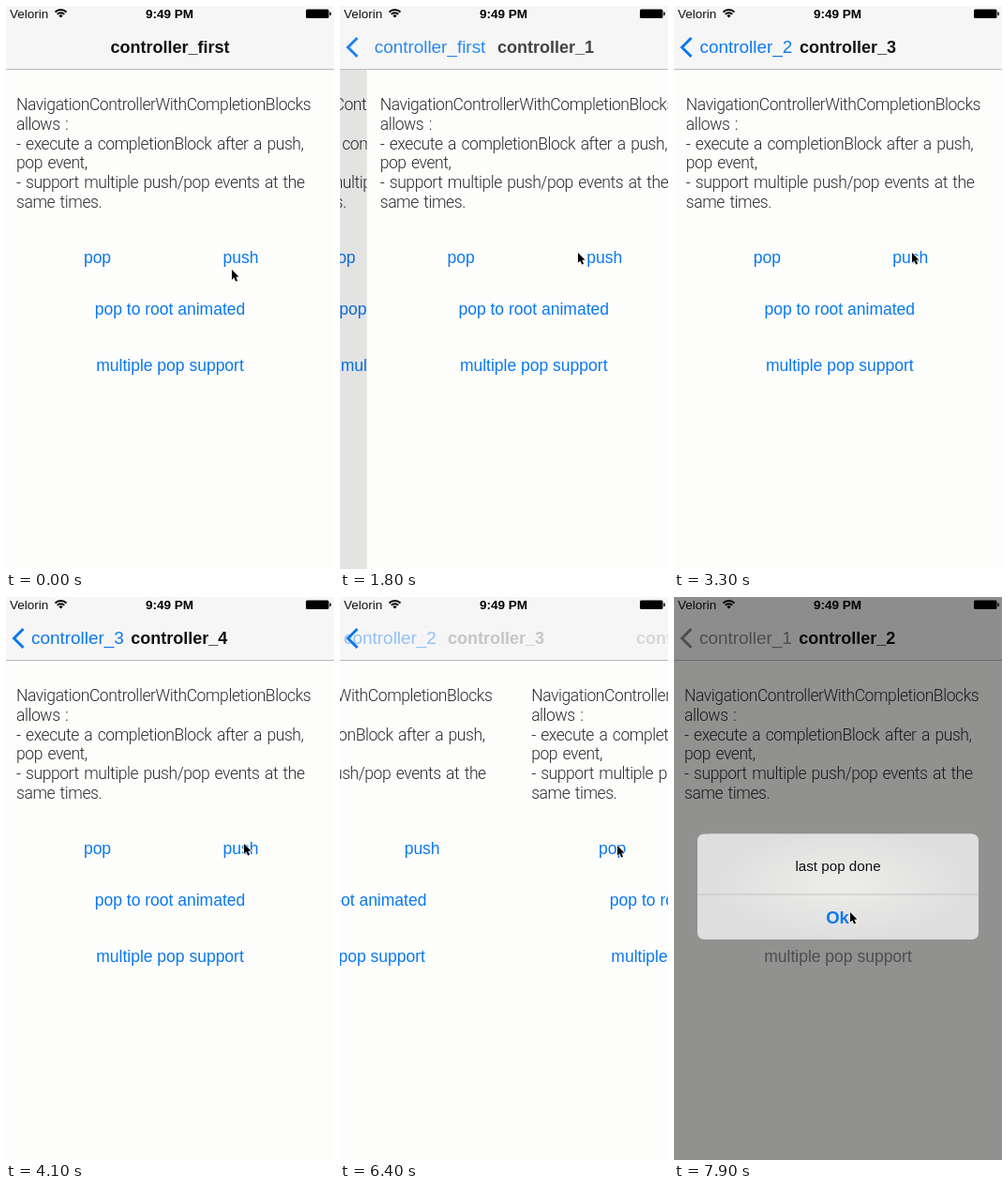
These frames come from a looping animation (350x600 px, 8 s). An HTML page with a canvas:

```html
<!DOCTYPE html>
<html lang="en">
<head>
<meta charset="utf-8">
<title>Navigation controller demo</title>
<style>
html, body { margin: 0; width: 100%; height: 100%; overflow: hidden; background: #fdfdfc; }
canvas { display: block; width: 350px; height: 600px; }
</style>
</head>
<body>
<canvas width="350" height="600"></canvas>
<script>
const ctx = document.querySelector('canvas').getContext('2d');
const W = 350, H = 600, NAV = 68, LOOP = 8000;
const SANS = '"Liberation Sans", Arial, sans-serif';
const FONT = {
  status: `13.5px ${SANS}`,
  clock: `bold 13.5px ${SANS}`,
  title: `bold 18px ${SANS}`,
  back: `18.9px ${SANS}`,
  button: `17.5px ${SANS}`,
  body: '300 17.5px Roboto, sans-serif',
  message: `15.2px ${SANS}`,
  ok: `bold 18.5px ${SANS}`
};
const PAPER = '#fdfdfc', BAR = '#f6f6f6', INK = '#111', SOFT_INK = '#2c2c2c';
const LINES = [
  'NavigationControllerWithCompletionBlocks',
  'allows :',
  '- execute a completionBlock after a push,',
  'pop event,',
  '- support multiple push/pop events at the',
  'same times.'
];
// [start in ms, level reached]
const MOVES = [[1577, 1], [2233, 2], [2889, 3], [3545, 4], [4200, 5],
               [5650, 4], [6299, 3], [6950, 2]];
const ALERT_AT = 7450;
// [ms, x, y]
const MOUSE = [[0, 241, 281], [900, 254, 263], [4950, 254, 263], [5500, 180, 380],
               [5700, 180, 380], [6300, 296, 265], [6800, 296, 265],
               [7600, 188, 336], [8000, 188, 336]];

const clamp = v => Math.max(0, Math.min(1, v));
const mix = (a, b, k) => a + (b - a) * k;
const settle = ms => { const w = ms * 0.018; return 1 - (1 + w) * Math.exp(-w); };
const nameOf = level => 'controller_' + (level || 'first');

function text(str, x, y, font, color, alpha = 1, align = 'left') {
  ctx.save();
  ctx.globalAlpha *= alpha;
  ctx.font = font;
  ctx.fillStyle = color;
  ctx.textAlign = align;
  ctx.fillText(str, x, y);
  ctx.restore();
}

function rect(x, y, w, h, color) {
  ctx.fillStyle = color;
  ctx.fillRect(x, y, w, h);
}

function width(str, font) {
  ctx.font = font;
  return ctx.measureText(str).width;
}

function titleX(level) {
  const centered = (W - width(nameOf(level), FONT.title)) / 2;
  if (!level) return centered;
  return Math.max(centered, 34.5 + width(nameOf(level - 1), FONT.back));
}

function page(x, tint) {
  rect(x - 3, NAV, W + 9, H - NAV, PAPER);
  ctx.save();
  ctx.letterSpacing = '-0.42px';
  ctx.wordSpacing = '1.6px';
  LINES.forEach((s, i) => text(s, x + 11, 111 + i * 20.8, FONT.body, SOFT_INK));
  ctx.restore();
  const button = (s, cx, y) => text(s, x + cx, y, FONT.button, tint, 1, 'center');
  button('pop', 97.5, 274);
  button('push', 250.5, 274);
  button('pop to root animated', 175, 329);
  button('multiple pop support', 175, 389);
}

function heading(level, tint, titleDx, backDx, titleAlpha, backAlpha) {
  text(nameOf(level), titleX(level) + titleDx, 50, FONT.title, INK, titleAlpha);
  if (level) text(nameOf(level - 1), 27 + backDx, 50, FONT.back, tint, backAlpha);
}

function chevron(tint, alpha) {
  ctx.save();
  ctx.globalAlpha = alpha;
  ctx.strokeStyle = tint;
  ctx.lineWidth = 3;
  ctx.beginPath();
  ctx.moveTo(18.5, 34);
  ctx.lineTo(8.5, 44);
  ctx.lineTo(18.5, 54);
  ctx.stroke();
  ctx.restore();
}

function statusBar() {
  text('Velorin', 4, 13, FONT.status, INK);
  text('9:49 PM', 174.5, 13, FONT.clock, '#000', 1, 'center');
  ctx.strokeStyle = ctx.fillStyle = '#000';
  ctx.lineWidth = 1.9;
  const arc = r => {
    ctx.beginPath();
    ctx.arc(58.5, 12.5, r, -Math.PI * 0.75, -Math.PI * 0.25);
  };
  [8.5, 5.3].forEach(r => { arc(r); ctx.stroke(); });
  arc(3);
  ctx.lineTo(58.5, 12.5);
  ctx.fill();
  ctx.beginPath();
  ctx.roundRect(320, 3.5, 24.5, 9.5, 1.5);
  ctx.fill();
  rect(345.3, 6.5, 1.5, 3.5, '#000');
}

function alertBox(k) {
  ctx.save();
  ctx.globalAlpha = k;
  ctx.globalCompositeOperation = 'multiply';
  rect(0, 0, W, H, '#929292');
  ctx.globalCompositeOperation = 'source-over';
  const scale = mix(1.2, 1, k);
  ctx.translate(175, 308.5);
  ctx.scale(scale, scale);
  ctx.translate(-175, -308.5);
  ctx.beginPath();
  ctx.roundRect(25, 252.5, 300, 112.5, 7);
  ctx.fillStyle = '#dedede';
  ctx.fill();
  ctx.clip();
  ctx.save();
  ctx.translate(178, 306);
  ctx.scale(1, 0.42);
  const glow = ctx.createRadialGradient(0, 0, 10, 0, 0, 140);
  glow.addColorStop(0, '#ececea');
  glow.addColorStop(1, '#dedede');
  ctx.fillStyle = glow;
  ctx.fillRect(-140, -140, 280, 280);
  ctx.restore();
  rect(25, 316.5, 300, 1, '#c4c4c4');
  text('last pop done', 175, 292, FONT.message, INK, 1, 'center');
  text('Ok', 174.5, 348, FONT.ok, '#0a78ee', 1, 'center');
  ctx.restore();
}

function mouse(t) {
  const i = MOUSE.findIndex(m => m[0] > t);
  const [t0, x0, y0] = MOUSE[i - 1], [t1, x1, y1] = MOUSE[i];
  const k = (t - t0) / (t1 - t0), e = k * k * (3 - 2 * k);
  ctx.save();
  ctx.translate(mix(x0, x1, e), mix(y0, y1, e));
  ctx.beginPath();
  [[0, 0], [0, 10.5], [2.4, 8.4], [4.2, 12.6], [6, 11.8], [4.3, 7.7], [7.4, 7.4]]
    .forEach(p => ctx.lineTo(...p));
  ctx.closePath();
  ctx.strokeStyle = '#f2f2f2';
  ctx.lineWidth = 1.4;
  ctx.stroke();
  ctx.fillStyle = '#000';
  ctx.fill();
  ctx.restore();
}

function draw(t) {
  const n = MOVES.filter(m => m[0] <= t).length;
  const [start, to] = n ? MOVES[n - 1] : [-9999, 0];
  const from = n > 1 ? MOVES[n - 2][1] : 0;
  const p = settle(t - start), rest = 1 - p, moving = rest > 0.002;
  const push = to > from;
  const dim = clamp((t - ALERT_AT) / 300);
  const shade = 1 - (1 - dim) ** 2;
  const tint = `rgb(${mix(10, 135, shade)},${mix(120, 135, shade)},${mix(238, 140, shade)})`;

  rect(0, 0, W, H, PAPER);
  if (moving && push) {
    page(-105 * p, tint);
    rect(0, NAV, W, H, `rgba(0,0,0,${0.11 * p})`);
    page(W * rest, tint);
  } else if (moving) {
    page(-356 * rest, tint);
    page(356 * p, tint);
  } else {
    page(0, tint);
  }

  rect(0, 0, W, NAV, BAR);
  rect(0, NAV - 1, W, 1, '#bababa');
  if (moving && push) {
    heading(from, tint, (27 - titleX(from)) * p, -107 * p, rest ** 2.6, rest ** 5);
    heading(to, tint, 165 * rest, 107 * rest, p ** 2.6, p ** 1.4);
  } else if (moving) {
    heading(from, tint, 337 * p, 107 * p, rest ** 2.6, rest ** 5);
    heading(to, tint, -40 * rest, -50 * rest, p ** 2.6, p ** 1.4);
  } else {
    heading(to, tint, 0, 0, 1, 1);
  }
  if (to) chevron(tint, from ? 1 : p);

  statusBar();
  if (dim) alertBox(shade);
  mouse(t);
}

function frame(now) {
  draw(Math.floor(now % LOOP / 100) * 100);
  requestAnimationFrame(frame);
}
requestAnimationFrame(frame);
</script>
</body>
</html>
```
